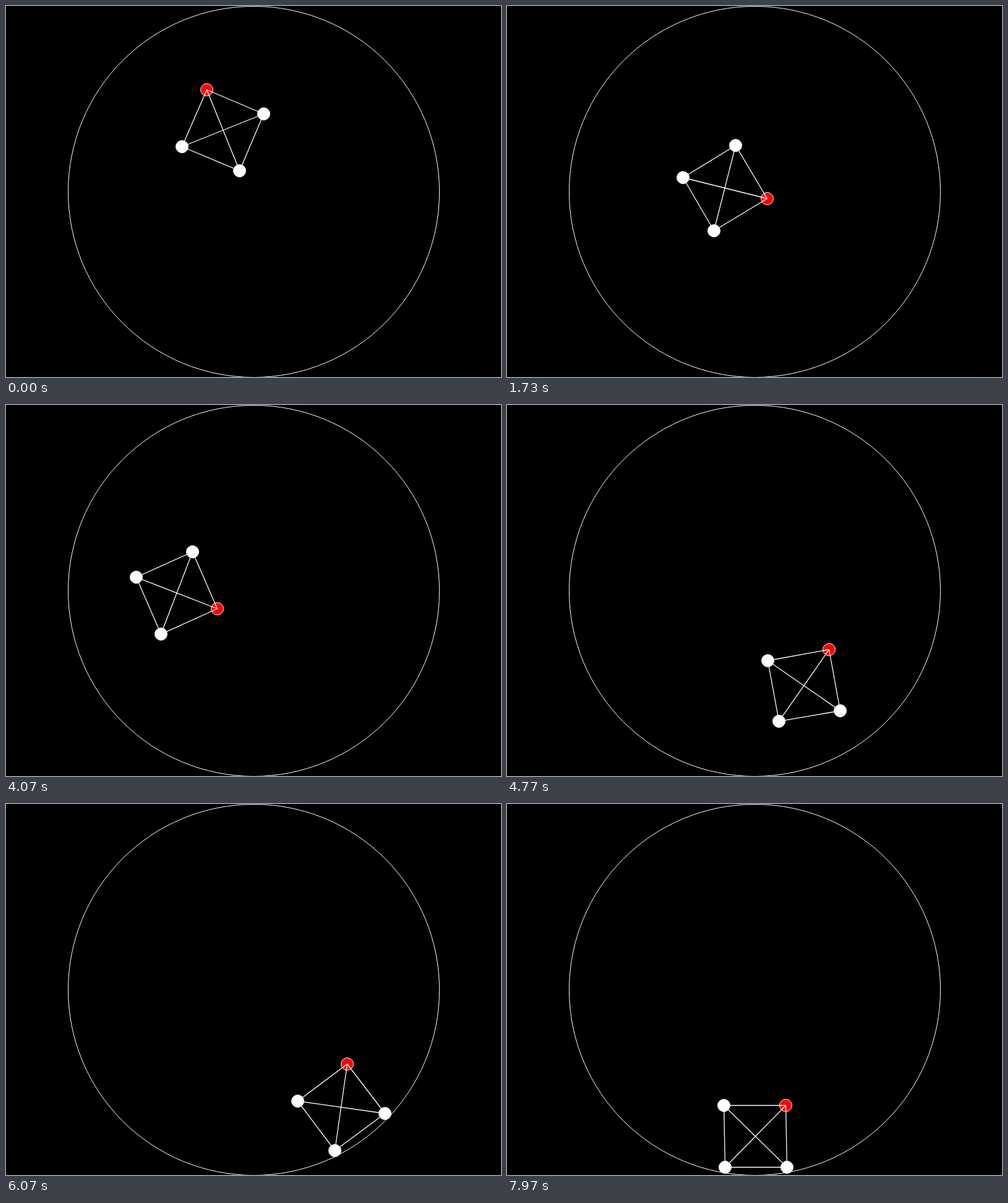
These frames come from a looping animation (800x600 px, 8000 ms). An HTML page:

```html
<!DOCTYPE html>
<html lang="en">
<head>
<meta charset="utf-8">
<title>Box in a circle</title>
<style>
  html, body { margin: 0; width: 100%; height: 100%; overflow: hidden; background: #000; }
  svg { display: block; stroke: #fff; stroke-width: 1; fill: #fff; }
  line { stroke-width: 1.3; }
</style>
</head>
<body>
<svg width="800" height="600" viewBox="0 0 800 600">
  <g id="scene" transform="translate(.5 .5)">
    <circle cx="400" cy="300" r="300" fill="none"/>
  </g>
</svg>
<script>
const LOOP = 8000, FPS = 0.03, RAD = Math.PI / 180;
const HALF_DIAGONALS = [70.4, 71.2], GRAVITY = 1100;
const scene = document.getElementById('scene');

function add(tag, attributes) {
  const node = document.createElementNS('http://www.w3.org/2000/svg', tag);
  scene.append(node);
  set(node, attributes);
  return node;
}
function set(node, attributes) {
  for (const name in attributes) node.setAttribute(name, attributes[name]);
}

const corners = [0, 1, 2, 3];
const dots = corners.map(i => add('circle', { r: 10, fill: i ? '#fff' : '#f00' }));
const links = corners.flatMap(i => corners.slice(i + 1).map(j => ({ i, j, line: add('line', {}) })));

// Centre and direction of the red corner; mode says how the box leaves each pose.
const poses = [
  { t: 0,    x: 350.3, y: 200.5, angle: -112,  mode: 'ease' },
  { t: 867,  x: 352,   y: 296,   angle: -42,   mode: 'ease' },
  { t: 1733, x: 351.8, y: 294,   angle: 14.3,  mode: 'ease' },
  { t: 3067, x: 323.8, y: 301.8, angle: -27.7, mode: 'ease' },
  { t: 4067, x: 275.5, y: 303.8, angle: 21.1,  mode: 'throw' },
  { t: 4150, x: 385,   y: 82,    angle: 0,     mode: 'fall' },
  { t: 4690, x: 475,   y: 505,   angle: -60,   mode: 'fall' },
  { t: 5433, x: 517.5, y: 276,   angle: -13.7, mode: 'fall' },
  { t: 5980, x: 545.2, y: 487.4, angle: -83,   mode: 'slide' }
];

// The box lies flat on the wall and glides to the lowest point.
function slide(seconds) {
  const tilt = 0.25 + 37.3 * Math.exp(-3.45 * seconds * seconds);
  return {
    x: 400 + 236.9 * Math.sin(tilt * RAD),
    y: 300 + 236.9 * Math.cos(tilt * RAD),
    angle: -45.4 - tilt
  };
}

function poseAt(t) {
  const index = poses.findLastIndex(pose => pose.t <= t);
  const from = poses[index], to = poses[index + 1];
  if (from.mode === 'slide') return slide((t - from.t) / 1000);
  const duration = (to.t - from.t) / 1000;
  const s = (t - from.t) / 1000 / duration;
  const u = from.mode === 'ease' ? s * s * (3 - 2 * s) : s;
  const mix = key => from[key] + (to[key] - from[key]) * u;
  const lift = from.mode === 'fall' ? GRAVITY / 2 * duration ** 2 * s * (1 - s) : 0;
  return { x: mix('x'), y: mix('y') - lift, angle: mix('angle') };
}

function draw(t) {
  const { x, y, angle } = poseAt(t);
  const points = corners.map(i => {
    const direction = (angle + 90 * i) * RAD, reach = HALF_DIAGONALS[i % 2];
    return {
      x: Math.round(x + reach * Math.cos(direction)),
      y: Math.round(y + reach * Math.sin(direction))
    };
  });
  points.forEach((p, i) => set(dots[i], { cx: p.x, cy: p.y }));
  for (const { i, j, line } of links) {
    set(line, { x1: points[i].x, y1: points[i].y, x2: points[j].x, y2: points[j].y });
  }
}

const start = performance.now();
function tick() {
  const t = (performance.now() - start) % LOOP;
  draw(Math.floor((t + 5) * FPS) / FPS);
  requestAnimationFrame(tick);
}
tick();
</script>
</body>
</html>
```
